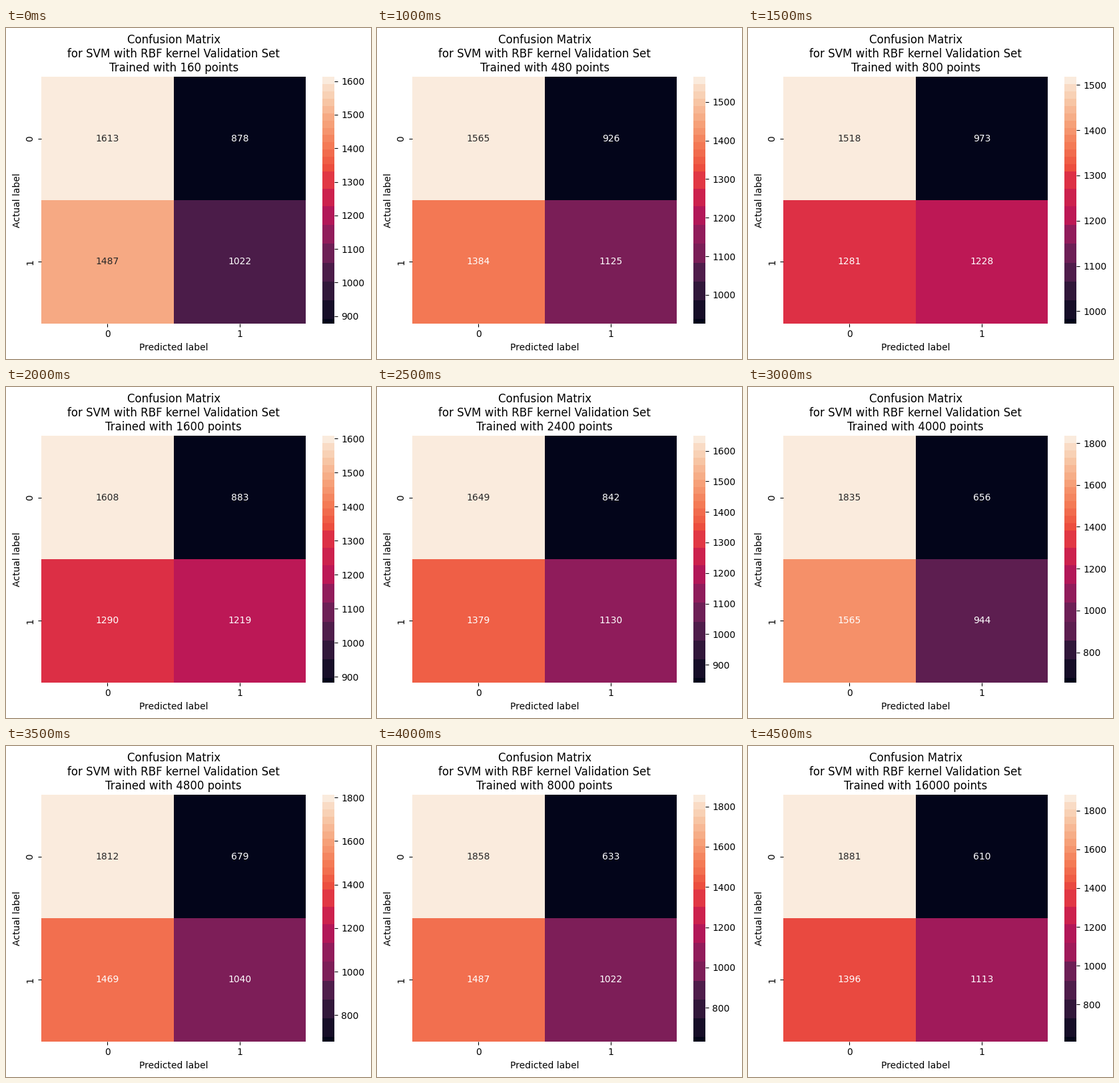
Animation, 548 px wide and 496 px high, one loop 5 s. Source, as a matplotlib script:

```python
import numpy as np
import matplotlib.pyplot as plt
from matplotlib.animation import FuncAnimation
from matplotlib.colors import LinearSegmentedColormap

W, H, DPI = 548, 496, 100
POINT = DPI / 72

# Outer padding, two 14 px text lines, then label and tick gaps in points.
MARGIN = 10 + 2 * 14 + (4 + 7) * POINT
GRID_W, GRID_H = 0.8 * 496, 0.77 * 480
BAR_X, BAR_W = MARGIN + 0.85 * 496, GRID_H / 20

FULL_SET = 16000
ROW_TOTALS = (2491, 2509)
# Wrong predictions per class, by percentage of the full training set.
ERRORS = {1: (878, 1487), 5: (973, 1281), 10: (883, 1290), 15: (842, 1379),
          25: (656, 1565), 30: (679, 1469), 50: (633, 1487), 100: (610, 1396)}
SHARES = sorted({*ERRORS, 3})

INK = "#03051a"
ramp = LinearSegmentedColormap.from_list("ramp", [
    INK, "#221331", "#451c47", "#691f55", "#921c5b", "#b91657",
    "#d92847", "#ed503e", "#f47d57", "#f6a47c", "#f7c9aa", "#faebdd"])

# Colour-bar bands get finer towards the light end.
edges = np.unique(np.r_[0, np.linspace(0.017, 0.476, 7),
                        np.linspace(0.476, 0.616, 3), np.linspace(0.616, 1, 14)])
middles = (edges[:-1] + edges[1:]) / 2
middles[0], middles[-1] = 0, 1

plt.rcParams.update({"font.family": "DejaVu Sans", "font.size": 10})


def add_axes(x, width):
    ax = fig.add_axes((x / W, MARGIN / H, width / W, GRID_H / H))
    ax.spines[:].set_visible(False)
    return ax


def confusion(share):
    errors = np.array(list(ERRORS.values()))
    false_pos, false_neg = (round(np.interp(share, list(ERRORS), column))
                            for column in errors.T)
    return np.array([[ROW_TOTALS[0] - false_pos, false_pos],
                     [false_neg, ROW_TOTALS[1] - false_neg]])


fig = plt.figure(figsize=(W / DPI, H / DPI), dpi=DPI, facecolor="white")

ax = add_axes(MARGIN, GRID_W)
cells = ax.pcolormesh(np.zeros((2, 2)), cmap=ramp, vmin=0, vmax=1)
ax.invert_yaxis()
ax.set_xticks([0.5, 1.5], ["0", "1"])
ax.set_yticks([0.5, 1.5], ["0", "1"], rotation="vertical", va="center")
ax.set_xlabel("Predicted label")
ax.set_ylabel("Actual label")
title = ax.set_title("")
counts = [ax.text(c + 0.5, r + 0.5, "", ha="center", va="center")
          for r in range(2) for c in range(2)]

bar = add_axes(BAR_X, BAR_W)
bands = bar.pcolormesh([0, 1], edges, middles[:, None], cmap=ramp, vmin=0, vmax=1)
bar.set_xticks([])
bar.set_ylim(0, 1)
bar.yaxis.tick_right()


def draw(step):
    # The first matrix is held for two steps.
    share = SHARES[max(step - 1, 0)]
    matrix = confusion(share)
    low, high = matrix.min(), matrix.max()
    level = (matrix - low) / (high - low)

    title.set_text("Confusion Matrix\nfor SVM with RBF kernel Validation Set\n"
                   f"Trained with {FULL_SET * share // 100} points")
    cells.set_array(level)
    for label, value, tone in zip(counts, matrix.flat, level.flat):
        label.set_text(str(value))
        label.set_color("#262626" if tone > 0.78 else "white")

    # Bands that hold a cell's value take exactly that cell's colour.
    shades = middles.copy()
    for tone in level[1]:
        shades[np.searchsorted(edges, tone) - 1] = tone
    bands.set_array(shades[:, None])

    gap = 100 if high - low < 900 else 200
    ticks = np.arange(-(-low // gap) * gap, high + 1, gap)
    bar.set_yticks((ticks - low) / (high - low), [str(t) for t in ticks])
    return [title, cells, bands, *counts]


anim = FuncAnimation(fig, draw, frames=len(SHARES) + 1, interval=500,
                     repeat=True, repeat_delay=0, blit=False)
plt.show()
```
